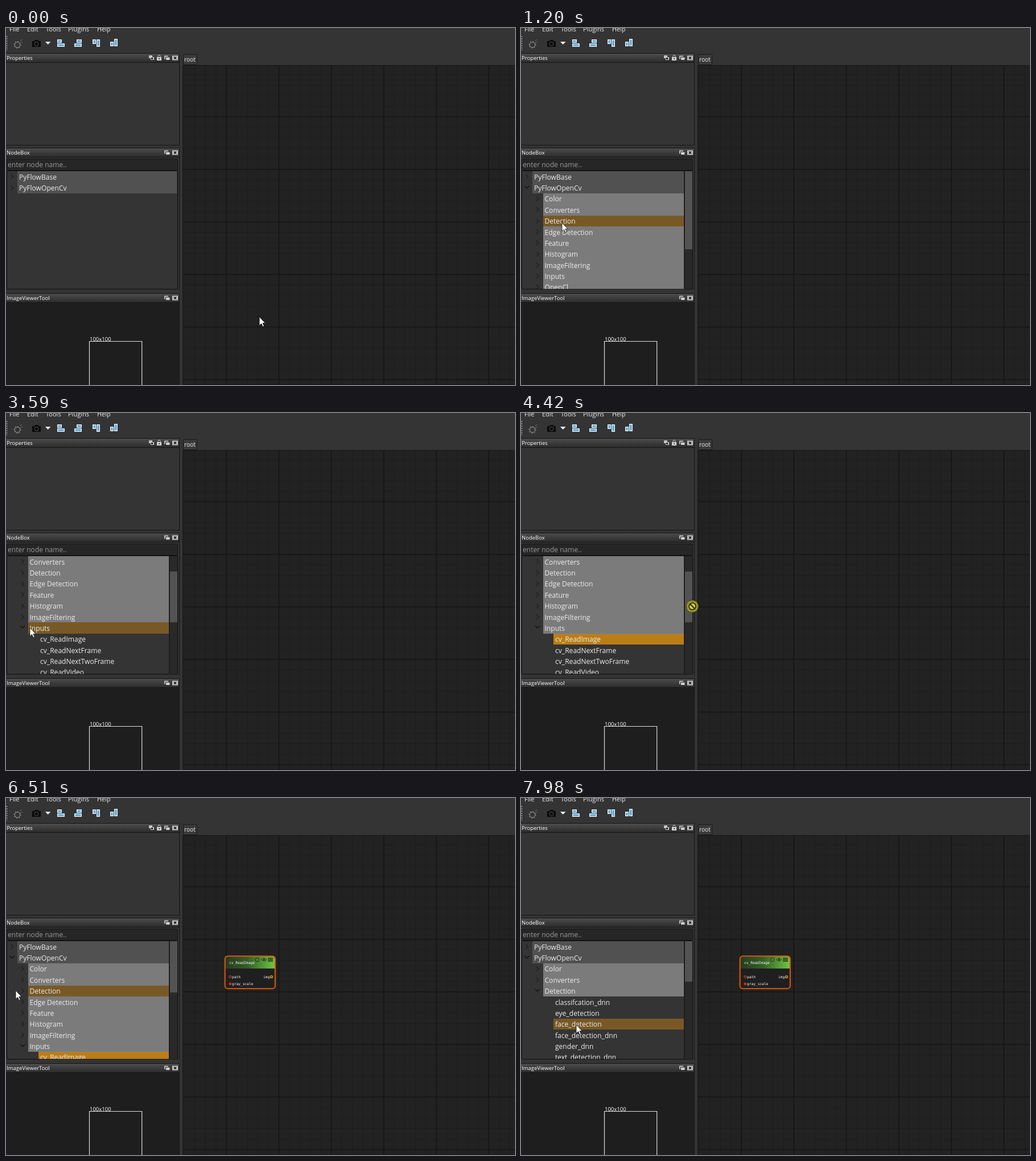
These frames come from a looping animation (894 px wide and 626 px high, 8000 ms). An HTML page:

```html
<!DOCTYPE html>
<html lang="en">
<head>
<meta charset="utf-8">
<title>Node editor</title>
<style>
html, body { margin: 0; width: 100%; height: 100%; overflow: hidden; background: #343434; }
svg { display: block; width: 894px; height: 626px; }
text { font-family: "Open Sans", "Noto Sans", sans-serif; fill: #ececec; white-space: pre; }
.item { font-size: 12.05px; }
.bar { font-size: 9.5px; fill: #fff; }
.menu { font-size: 11px; }
.mono { font-family: "DejaVu Sans Mono", monospace; font-size: 6.2px; fill: #fff; }
#tree rect { shape-rendering: crispEdges; }
</style>
</head>
<body>
<svg viewBox="0 0 894 626">
  <defs>
    <linearGradient id="title" x2="0" y2="1">
      <stop offset="0" stop-color="#4c4c4c"/><stop offset="1" stop-color="#2c2c2c"/>
    </linearGradient>
    <linearGradient id="head">
      <stop offset="0" stop-color="#263b1f"/><stop offset=".45" stop-color="#355f27"/><stop offset="1" stop-color="#70c646"/>
    </linearGradient>
    <clipPath id="treeClip"><rect x="2" y="251" width="299" height="206.5"/></clipPath>
    <clipPath id="canvasClip"><rect x="311" y="66" width="583" height="559"/></clipPath>
  </defs>
  <rect width="894" height="626" fill="#343434"/>
  <g id="chrome"></g>

  <g id="toolbar">
    <path d="M1.5 14V39" stroke="#cfcfcf" stroke-dasharray="2 2"/>
    <g fill="none" stroke="#a2a2a2">
      <circle cx="20" cy="29.5" r="4.8"/>
      <circle cx="20" cy="29.5" r="6" stroke-width="1.2" stroke-dasharray="1.2 3.51"/>
      <path d="M25 23L28 20M27 25H29" stroke="#777"/>
    </g>
    <path d="M46 23H50L51.5 21H56L57.5 23H61V33H46Z" fill="#090909"/>
    <circle cx="53.5" cy="27.8" r="3.4" fill="none" stroke="#444" stroke-width="1.2"/>
    <path d="M69 24H78.5L73.7 29Z" fill="#f0f0f0"/>
    <g id="align"></g>
  </g>

  <rect x="311.5" y="46.5" width="24" height="18" rx="1" fill="#3a3a3a" stroke="#191919"/>
  <text x="313" y="59" font-size="10.2">root</text>
  <rect x="310" y="65" width="584" height="561" fill="#171717"/>
  <rect x="311" y="66" width="583" height="559" fill="#222"/>
  <g id="grid" clip-path="url(#canvasClip)"></g>

  <rect x="1.5" y="229.5" width="300" height="20" rx="1.5" fill="#262626" stroke="#161616"/>
  <text class="item" x="3" y="244" style="fill:#989898">enter node name..</text>
  <rect x="1.5" y="250.5" width="300" height="207.5" rx="1" fill="#343434" stroke="#0d0d0d"/>
  <g id="tree" clip-path="url(#treeClip)"></g>

  <rect y="482" width="304" height="144" fill="#1e1e1e"/>
  <path d="M146.5 626V549.5H238.7V626" fill="none" stroke="#dedede" stroke-width="1.2"/>
  <text class="bar" x="147" y="549">100x100</text>

  <g id="node">
    <rect x="384.6" y="277.2" width="88.2" height="57" rx="5" fill="#1f1f1f"/>
    <path d="M385 299V282Q385 277.5 389.5 277.5H468Q472.5 277.5 472.5 282V299Z" fill="url(#head)"/>
    <g fill="none" stroke="#1b3212">
      <circle cx="441.5" cy="283.5" r="3.3"/>
      <path d="M448.5 283.5Q453 278.5 458 283.5Q453 288 448.5 283.5Z"/>
      <path d="M460 281H469M460 283.5H469M460 286H469" stroke-width="1.5"/>
    </g>
    <circle cx="453.2" cy="283.3" r="1.4" fill="#1b3212"/>
    <rect x="384.6" y="277.2" width="88.2" height="57" rx="5" fill="none" stroke="#d9560f" stroke-width="2.1"/>
    <text class="mono" x="392" y="290.5">cv_ReadImage</text>
    <text class="mono" x="397" y="315.5">path</text>
    <text class="mono" x="397" y="328">gray_scale</text>
    <text class="mono" x="452" y="315.5">img</text>
    <circle cx="393.7" cy="313.5" r="1.9" fill="#3a1712" stroke="#d4573f"/>
    <circle cx="393.7" cy="326" r="2.4" fill="#c92f14"/>
    <circle cx="466.3" cy="313.5" r="2" fill="#4a3a10" stroke="#e3b325" stroke-width="1.2"/>
  </g>

  <path id="arrow" d="M0 .5V15.6L3.5 12.3 5.9 17.7 8.2 16.7 5.9 11.4H10.3Z" fill="#fff" stroke="#111" stroke-width=".8"/>
  <g id="deny">
    <circle r="10.5" fill="#e2dc35" stroke="#2b2a10" stroke-width=".8"/>
    <circle r="8.8" fill="none" stroke="#4a4812"/>
    <circle r="6.2" fill="#d8d13a" stroke="#34330c" stroke-width="2.2"/>
    <path d="M-4.4 -4.4L4.4 4.4" stroke="#34330c" stroke-width="2.2"/>
  </g>
</svg>
<script>
const $ = id => document.getElementById(id);
const box = (x, y, w, h, fill) => `<rect x="${x}" y="${y}" width="${w}" height="${h}" fill="${fill}"/>`;
const label = (x, y, s, cls) => `<text class="${cls}" x="${x}" y="${y}">${s}</text>`;

// Dock windows
function floatIcon(x, y) {
  return box(x - 4, y - 4, 7, 6, "#bcbcbc") + box(x - 2, y - 2, 8, 6, "#222") + box(x - 1, y - 1, 6.5, 4.5, "#d0d0d0");
}
function closeIcon(x, y) {
  return box(x - 5, y - 4, 10, 8, "#c4c4c4") +
    `<path d="M${x - 2} ${y - 2}l4 4m0 -4l-4 4" stroke="#151515" stroke-width="1.6"/>`;
}
function dock(y, name, bottom) {
  return box(0, y - 1, 305, bottom - y + 1, "#151515") + box(0, y, 304, 15, "url(#title)") +
    box(0, y + 16, 304, bottom - y - 17, "#343434") + label(1, y + 11, name, "bar") +
    floatIcon(282, y + 7.5) + closeIcon(297, y + 7.5);
}
const menus = [[6, "File"], [37, "Edit"], [70, "Tools"], [109, "Plugins"], [160, "Help"]];
$("chrome").innerHTML = menus.map(([x, s]) => label(x, 6, s, "menu")).join("") +
  dock(45, "Properties", 206) + dock(211, "NodeBox", 460) + dock(466, "ImageViewerTool", 626) +
  box(0, 227, 304, 233, "#343434") +
  box(251, 48, 6, 5, "#c4c4c4") + box(254, 51, 6, 5, "#c4c4c4") + box(255, 52, 3, 3, "#222") +
  `<path d="M267 51V49.5a2 2 0 0 1 4 0V51" fill="none" stroke="#c8c8c8"/>` +
  box(265, 51, 8, 6, "#d0d0d0") + box(268.5, 53, 1.5, 2, "#222");

const block = (x, y, w, h) => box(x, y, w, h, "#e3eff7") + box(x + 1.5, y + 1.5, w - 3, h - 3, "#4c9fd8");
$("align").innerHTML =
  block(90, 20, 8, 6) + block(90, 27, 13, 6) +
  block(124, 20, 9, 6) + block(120, 27, 13, 6) +
  block(152, 20, 6, 8) + block(159, 20, 6, 13) +
  block(183, 24, 6, 8) + block(190, 19, 6, 13);

// Canvas grid
let lines = "";
const cell = 18.44;
for (const major of [false, true]) {
  for (let i = -4; i < 28; i++) {
    if ((i % 5 === 0) !== major) continue;
    const x = 387 + i * cell, y = 155.6 + i * cell;
    lines += `<path d="M${x} 66V625M311 ${y}H894" stroke="${major ? "#161616" : "#1e1e1e"}" stroke-width="${major ? 1.7 : 1}"/>`;
  }
}
$("grid").innerHTML = lines;

// Node tree
const groups = ["Color", "Converters", "Detection", "Edge Detection", "Feature", "Histogram", "ImageFiltering",
  "Inputs", "OpenCl", "Process", "Transformations", "VideoAnalysis", "Viewers"];
const children = {
  Inputs: ["cv_ReadImage", "cv_ReadNextFrame", "cv_ReadNextTwoFrame", "cv_ReadVideo",
    "cv_ReadVideoFrame", "cv_ReadCamera", "cv_ReadFolder", "cv_ReadStream"],
  Detection: ["classifcation_dnn", "eye_detection", "face_detection", "face_detection_dnn", "gender_dnn", "text_detection_dnn"]
};
const top0 = 251.3, rowH = 19.36, indent = 18.5, page = 10;

function listRows(open) {
  const rows = [{ name: "PyFlowBase", level: 0 }, { name: "PyFlowOpenCv", level: 0, open: open.root }];
  if (open.root) for (const name of groups) {
    rows.push({ name, level: 1, open: open[name] });
    if (open[name]) for (const kid of children[name]) rows.push({ name: kid, level: 2 });
  }
  return rows;
}

function drawTree(open, offset, cur, selected) {
  const rows = listRows(open), max = rows.length - page;
  const right = max > 0 ? 286 : 300;
  let out = "";
  rows.slice(offset, offset + 11).forEach((row, i) => {
    const y = Math.round(top0 + i * rowH), next = Math.round(top0 + (i + 1) * rowH);
    const left = 20 + row.level * indent;
    // Pointing at the expander does not highlight the row
    const onBranch = row.level < 2 && cur.x >= left - indent && cur.x < left;
    const hover = !cur.drag && cur.x > 2 && cur.x < right && cur.y >= y && cur.y < next && cur.y < 457 && !onBranch;
    const chosen = selected && row.name === "cv_ReadImage";
    const fill = chosen ? "#ba7e18" : hover ? "#785926" : ["#515151", "#7b7b7b", "none"][row.level];
    out += box(left, y, right - left, next - y, fill);
    if (chosen) out += box(left, y - 1, right - left, 1, "#5b83b5");
    if (row.level < 2) {
      const cx = left - 9.5, cy = y + 9.5;
      out += `<path d="${row.open ? `M${cx - 4} ${cy - 3.5}l4 4 4 -4` : `M${cx - 2} ${cy - 4}l4 4 -4 4`}" fill="none" stroke="${row.open ? "#111" : "#1f1f1f"}" stroke-width="1.3"/>`;
    }
    out += label(left + 3, Math.round(top0 + i * rowH + 14.4), row.name, "item");
  });
  if (max > 0) {
    const h = 206 * page / (page + max), y = 251 + offset / max * (206 - h);
    out += box(286, 251, 15, 207, "#1e1e1e") + box(288, 251, 13, 207, "#292929") + box(288, y, 13, h, "#535353");
  }
  return out;
}

// Pointer moves: start, end, number of steps, then [step, x, y] points
const start = [445, 506];
const moves = [
  [70, 670, 9, [[4, 270, 405], [7, 60, 296], [9, 8, 273]]],
  [820, 1510, 10, [[1, 8, 273], [4, 48, 312], [6, 72, 341], [8, 66, 354], [10, 52, 364]]],
  [1970, 2670, 10, [[4, 40, 350], [8, 27, 333], [10, 27, 353]]],
  [2900, 2970, 2, [[2, 31, 368]]],
  [3200, 3960, 11, [[1, 31, 368], [6, 42, 376], [11, 65, 390]]],
  [4040, 4120, 2, [[2, 69, 394]]],
  [4270, 4880, 9, [[1, 80, 391], [3, 301, 339], [6, 395, 264], [9, 384, 277]]],
  [5050, 5820, 11, [[3, 310, 305], [6, 165, 360], [9, 120, 371], [11, 108, 374]]],
  [5890, 6660, 11, [[5, 50, 356], [9, 17, 337], [11, 24, 334]]],
  [6830, 7440, 9, [[1, 24, 334], [5, 48, 356], [9, 80, 380]]],
  [7670, 7980, 5, [[5, 97, 397]]]
];
const slack = 8;

function pointer(t) {
  let last = start;
  for (const [t0, t1, n, points] of moves) {
    if (t < t0) break;
    const step = Math.min(n, 1 + Math.floor((t - t0 + slack) * (n - 1) / (t1 - t0)));
    let from = 0;
    for (const [to, x, y] of points) {
      if (step < to) {
        const p = (step - from) / (to - from);
        return { x: last[0] + (x - last[0]) * p, y: last[1] + (y - last[1]) * p };
      }
      last = [x, y];
      from = to;
    }
  }
  return { x: last[0], y: last[1] };
}

let shown = "";
function draw(t) {
  const cur = pointer(t);
  cur.drag = t >= 4270 && t < 4880;
  const deny = cur.drag && cur.x < 311;
  const open = { root: t >= 820, Inputs: t >= 3200, Detection: t >= 6830 };
  const offset = t >= 1740 && t < 5510 ? 3 : 0;
  const tree = drawTree(open, offset, cur, t >= 4270);
  if (tree !== shown) $("tree").innerHTML = shown = tree;
  $("node").style.display = t >= 4880 ? "" : "none";
  $("arrow").style.display = deny ? "none" : "";
  $("deny").style.display = deny ? "" : "none";
  $(deny ? "deny" : "arrow").setAttribute("transform", `translate(${Math.round(cur.x)} ${Math.round(cur.y)})`);
}

function tick() {
  draw(performance.now() % 8000);
  requestAnimationFrame(tick);
}
tick();
</script>
</body>
</html>
```
